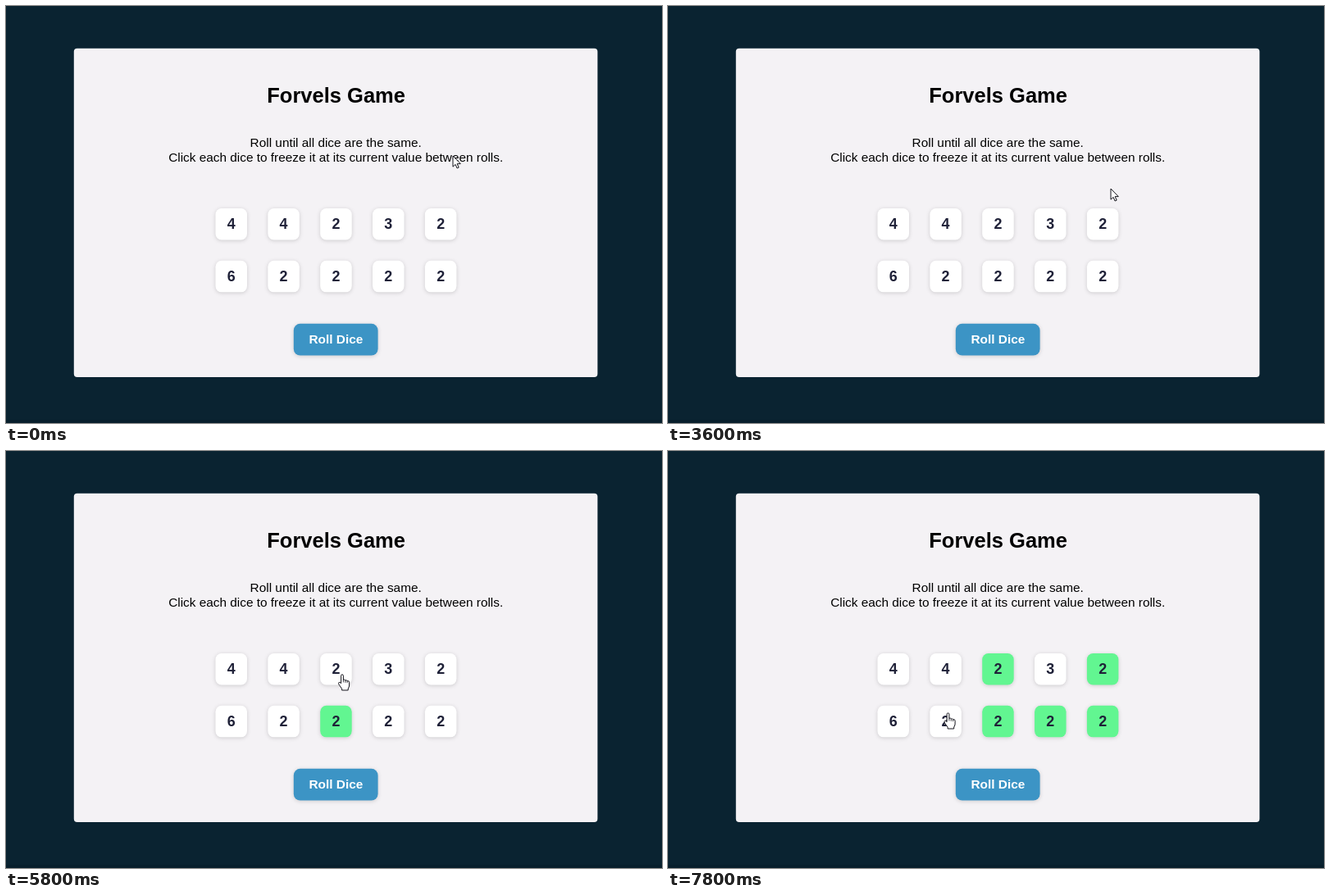
Write an HTML page that moves like this. It is 800 px wide and 509 px high and loops after 8 s.

```html
<!DOCTYPE html>
<html lang="en">
<head>
<meta charset="utf-8">
<title>Dice game</title>
<style>
  html, body { margin: 0; width: 100%; height: 100%; overflow: hidden; background: #0a2331; }
  svg { display: block; width: 800px; height: 509px; }
  text { font-family: "Liberation Sans", Arial, sans-serif; text-anchor: middle; fill: #000; }
  .title { font-size: 25.5px; font-weight: 700; }
  .info { font-size: 15.36px; }
  .die rect, .button rect { filter: drop-shadow(0 1.5px 2.4px rgba(0, 0, 0, .16)); }
  .die rect { fill: #fff; }
  .die.held rect { fill: #62f691; }
  .die text { font-size: 17.9px; font-weight: 700; fill: #1f2138; }
  .button rect { fill: #3c94c5; }
  .button text { font-size: 15.4px; font-weight: 700; fill: #fff; }
  #cursor path { fill: #fff; stroke: #15151c; stroke-width: 1; stroke-linejoin: round; }
  #cursor .lines { fill: none; stroke-width: .8; }
</style>
</head>
<body>
<svg viewBox="0 0 800 509">
  <rect width="800" height="509" fill="#0a2331"/>
  <rect y="505" width="800" height="4" fill="#081f2c"/>
  <rect x="82.8" y="51.8" width="638.6" height="401.2" rx="4" fill="#f4f2f5"/>
  <text class="title" x="402.6" y="118">Forvels Game</text>
  <text class="info" x="402.2" y="172">Roll until all dice are the same.</text>
  <text class="info" x="402.2" y="189.5">Click each dice to freeze it at its current value between rolls.</text>
  <g id="dice"></g>
  <g class="button">
    <rect x="350.8" y="387.8" width="102.8" height="38.8" rx="8"/>
    <text x="402.4" y="412">Roll Dice</text>
  </g>
  <g id="cursor">
    <path id="arrow" d="M0 0V13.2L3.1 10.4L5.1 15L7.2 14.1L5.2 9.6H9.3Z"/>
    <g id="hand">
      <path d="M-1.4 1.2C-1.4-.6 1.4-.6 1.4 1.2V6.2Q2.9 5.6 3.8 6.9Q5.3 6.3 6.1 7.7Q8.4 7.2 8.6 9.2V13Q8.6 15 7.2 17V19H-.4V17.2L-3.9 12.2Q-5 10.2-4 9.4Q-3 8.7-1.4 10.6Z"/>
      <path class="lines" d="M1.4 6V9.4M3.8 7V9.8M6.1 7.7V10.1"/>
    </g>
  </g>
</svg>
<script>
const LOOP = 8000, STEP = 200, SIZE = 38.5, PITCH = 63.85;
const $ = id => document.getElementById(id);

// Cursor stops: arrival time, x, y. Stopping on a die clicks it one step later.
const stops = [
  [0, 545, 183], [800, 522, 45], [2400, 522, 46], [3600, 540, 223], [5000, 400.5, 317.3],
  [5800, 410, 273], [6200, 530, 272], [6600, 468, 332], [7000, 540, 342.7], [7800, 341.5, 320]
];

function make(tag, parent, attrs) {
  const el = document.createElementNS("http://www.w3.org/2000/svg", tag);
  for (const key in attrs) el.setAttribute(key, attrs[key]);
  return parent.appendChild(el);
}

const inside = (die, x, y) => Math.max(Math.abs(x - die.cx), Math.abs(y - die.cy)) <= SIZE / 2;

const dice = [..."4423262222"].map((value, i) => {
  const x = 255.5 + (i % 5) * PITCH, y = 247 + Math.floor(i / 5) * PITCH;
  const die = { cx: x + SIZE / 2, cy: y + SIZE / 2 };
  die.el = make("g", $("dice"), { class: "die" });
  make("rect", die.el, { x, y, width: SIZE, height: SIZE, rx: 7.5 });
  make("text", die.el, { x: die.cx, y: y + 25.2 }).textContent = value;
  const stop = stops.find(([, sx, sy]) => inside(die, sx, sy));
  die.click = stop ? stop[0] + STEP : Infinity;
  return die;
});

function cursorAt(t) {
  const i = stops.findLastIndex(s => s[0] <= t);
  const [t0, x0, y0] = stops[i], [t1, x1, y1] = stops[i + 1] || stops[i];
  const k = t1 > t0 ? (t - t0) / (t1 - t0) : 0;
  const ease = k * k * (3 - 2 * k);
  return [x0 + (x1 - x0) * ease, y0 + (y1 - y0) * ease];
}

function draw(now) {
  const t = Math.floor((now % LOOP) / STEP) * STEP;
  const [x, y] = cursorAt(t);
  const over = dice.some(die => inside(die, x, y));
  dice.forEach(die => die.el.classList.toggle("held", t >= die.click));
  $("cursor").setAttribute("transform", `translate(${x} ${y})`);
  $("arrow").style.display = over ? "none" : "";
  $("hand").style.display = over ? "" : "none";
}

const start = performance.now();
function tick() {
  draw(performance.now() - start);
  requestAnimationFrame(tick);
}
tick();
</script>
</body>
</html>
```
